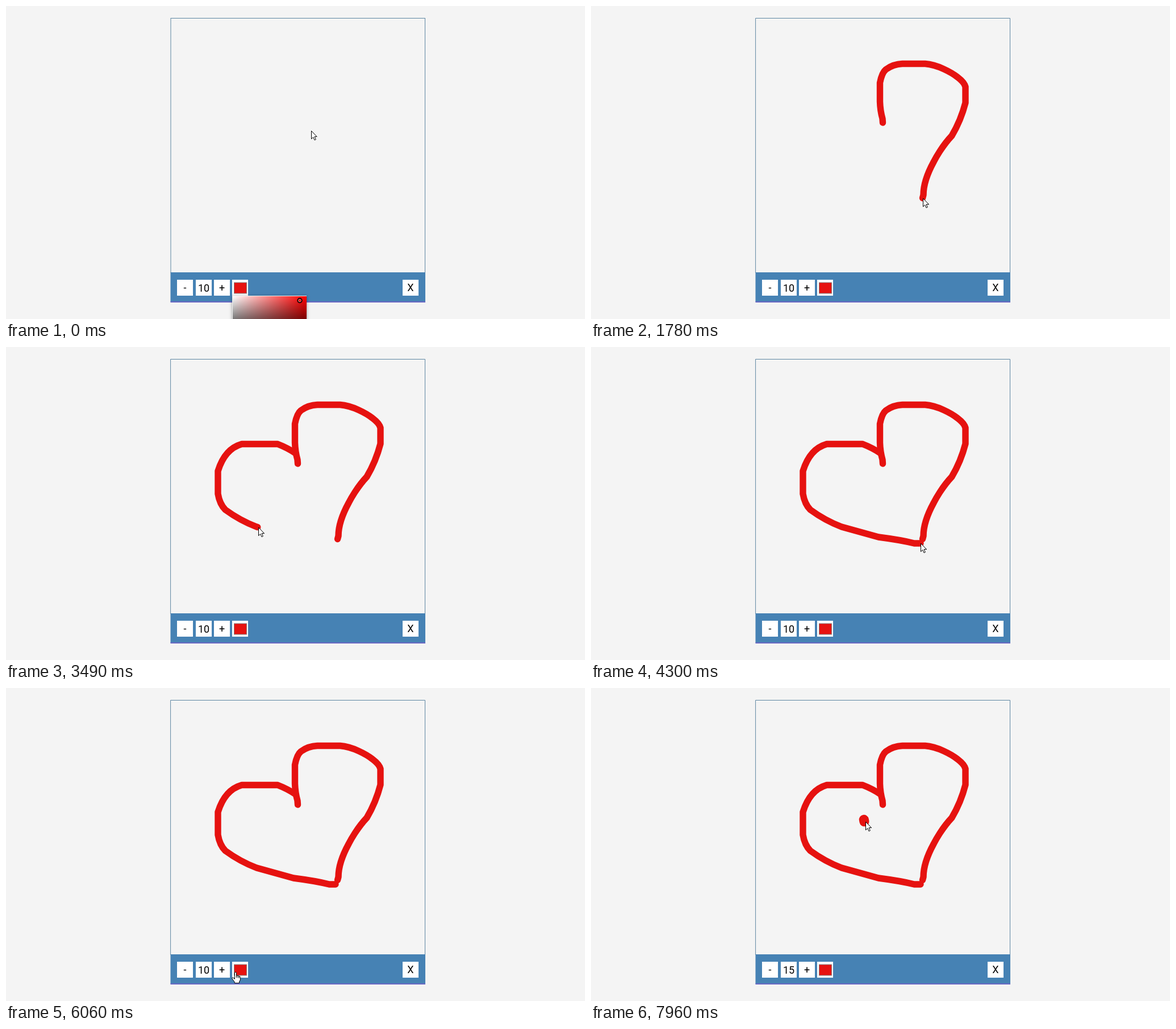
These frames come from a looping animation (1019 px wide and 550 px high, 8 s). An HTML page with a canvas:

```html
<!DOCTYPE html>
<html lang="en">
<head>
<meta charset="utf-8">
<title>Drawing pad</title>
<style>
  html, body { margin: 0; width: 100%; height: 100%; overflow: hidden; background: #f4f4f4; }
  canvas { display: block; }
</style>
</head>
<body>
<canvas id="stage" width="1019" height="550"></canvas>
<script>
const ctx = document.getElementById('stage').getContext('2d');
const LOOP = 8000, STEP = 135;
const RED = '#e61210';
const INK = 1.14;

// The picture refreshes in even steps of about STEP ms between these beats
const beats = [0, 850, 1780, 2800, 4300, 6060, 7960];

function snap(t) {
  const i = beats.findLastIndex(b => t >= b);
  if (i === beats.length - 1) return beats[i];
  const gap = beats[i + 1] - beats[i];
  const step = gap / Math.round(gap / STEP);
  return beats[i] + Math.floor((t - beats[i]) / step + 1e-6) * step;
}

// One pointer movement along a path; power > 1 eases out.
// With the pen down it leaves ink, and the pointer runs `lead` ms ahead of it.
function leg(from, to, d, { power = 1, pen = false, lead = 0 } = {}) {
  const track = document.createElementNS('http://www.w3.org/2000/svg', 'path');
  track.setAttribute('d', d);
  const total = track.getTotalLength();
  const shape = new Path2D(d);
  const travelled = t => {
    const u = Math.min(1, Math.max(0, (t - from) / (to - from)));
    return total * (1 - (1 - u) ** power);
  };
  return {
    from,
    at: t => track.getPointAtLength(travelled(t + lead)),
    draw(t) {
      if (!pen || t <= from) return;
      ctx.setLineDash([travelled(t), total + 50]);
      ink(shape, 10);
      ctx.setLineDash([]);
    }
  };
}

const legs = [
  leg(0, 180, 'M537 219L513 205'),
  leg(180, 1780,
    'M513.5 205L513 198Q509 184 508.5 168V135Q512 117 519 111.5Q532 102 548 101.5H588' +
    'C610 103 635 117 645 125Q657 134 659 142V170Q651 201 635 228' +
    'C618 246 606 268 603 274Q585 307 585 332L583.5 337.5', { pen: true, lead: 24 }),
  leg(1780, 2290, 'M584 338L511 186'),
  leg(2470, 4300,
    'M510 187Q495 177 478 170.5H415Q385 179 373 218V258Q376 276 386 286' +
    'Q412 305 441 316L506 334Q545 339 569 345H580', { pen: true, lead: 8, power: 1.42 }),
  leg(4300, 5540, 'M580 345C700 400 790 450 762 490S480 545 346 504'),
  leg(5540, 6060, 'M346 504Q320 514 404 499'),
  leg(6190, 6610, 'M404 499L381 494'),
  leg(6910, 7960, 'M381 494C500 250 610 190 483 235', { power: 2 })
];
const dot = new Path2D('M480.3 231.3L481 234.8');

const buttons = [
  { x: 301, label: '-' },
  { x: 334, count: true },
  { x: 366, label: '+' },
  { x: 398, swatch: true },
  { x: 698, label: 'X' }
];
const SIDE = 28, ROW = 481;

function rect(x, y, w, h, fill) {
  ctx.fillStyle = fill;
  ctx.fillRect(x, y, w, h);
}

function ink(path, size) {
  ctx.strokeStyle = RED;
  ctx.lineWidth = size * INK;
  ctx.lineCap = ctx.lineJoin = 'round';
  ctx.stroke(path);
}

function drawPad() {
  rect(0, 0, 1019, 550, '#f4f4f4');
  ctx.strokeStyle = '#5d86a2';
  ctx.lineWidth = 1;
  ctx.strokeRect(290, 21.5, 447.5, 447);
}

function drawToolbar(count) {
  rect(289.5, 468, 448.5, 52, '#4682b4');
  rect(289.5, 519, 448.5, 2, '#6a68c4');
  ctx.font = '18px Roboto, sans-serif';
  ctx.textAlign = 'center';
  for (const b of buttons) {
    rect(b.x, ROW, SIDE, SIDE, '#fff');
    if (b.swatch) {
      rect(401, 485.5, 23, 20, '#857f7f');
      rect(402, 486.5, 21, 18, RED);
    } else {
      ctx.fillStyle = '#000';
      ctx.fillText(b.count ? count : b.label, b.x + SIDE / 2, b.count ? 502 : 501);
    }
  }
}

function gradient(x0, y0, x1, y1, from, to) {
  const g = ctx.createLinearGradient(x0, y0, x1, y1);
  g.addColorStop(0, from);
  g.addColorStop(1, to);
  return g;
}

function ring(x, y, r, width, color) {
  ctx.beginPath();
  ctx.arc(x, y, r, 0, 7);
  ctx.lineWidth = width;
  ctx.strokeStyle = color;
  ctx.stroke();
}

function drawPicker() {
  ctx.save();
  ctx.shadowColor = 'rgba(0,0,0,.4)';
  ctx.shadowBlur = 5;
  ctx.shadowOffsetY = 1;
  rect(398, 509, 131, 60, '#eee');
  ctx.restore();
  rect(399, 510, 130, 40, gradient(399, 0, 529, 0, '#fff', '#f00'));
  rect(399, 510, 130, 40, gradient(0, 510, 0, 586, 'rgba(0,0,0,0)', '#000'));
  ring(517, 517.5, 3.6, 2.2, '#1a0000');
  ring(517, 517.5, 2.4, 0.7, '#f3b0b0');
}

const arrow = new Path2D('M.5 .5V14.6L3.8 11.5L6 16.6L8.3 15.6L6.1 10.6H10.2Z');
const hand = new Path2D(
  'M-1.6 12V1.6Q-1.6 .4 0 .4Q1.5 .4 1.5 1.6V6.4Q2.8 5.4 4 6.9Q5.4 6.2 6.3 7.7' +
  'Q8.4 7.2 8.4 9.4V14L6.6 17V19.4H-1.8V17.4L-5.8 12.2Q-6.8 10.6 -5.6 9.9' +
  'Q-4.4 9.4 -3.2 10.8Z');
const knuckles = new Path2D('M1.5 6.4V9.6M4 6.9V10M6.3 7.7V10.4');

function overButton(x, y) {
  return buttons.some(b => !b.count && x >= b.x && x <= b.x + SIDE && y >= ROW && y <= ROW + SIDE);
}

function drawPointer({ x, y }) {
  const pressable = overButton(x, y);
  ctx.save();
  ctx.translate(Math.round(x), Math.round(y));
  ctx.fillStyle = '#fff';
  ctx.strokeStyle = '#000';
  ctx.lineWidth = 1;
  ctx.lineJoin = 'miter';
  ctx.fill(pressable ? hand : arrow);
  ctx.stroke(pressable ? hand : arrow);
  if (pressable) ctx.stroke(knuckles);
  ctx.restore();
}

function render(t) {
  drawPad();
  legs.forEach(l => l.draw(t));
  if (t >= 7960) ink(dot, 15);
  drawToolbar(t < 6910 ? 10 : 15);
  if (t < 120) drawPicker();
  drawPointer(legs.findLast(l => t >= l.from).at(t));
}

const begin = performance.now();
function tick() {
  render(snap((performance.now() - begin) % LOOP));
  requestAnimationFrame(tick);
}
tick();
</script>
</body>
</html>
```
